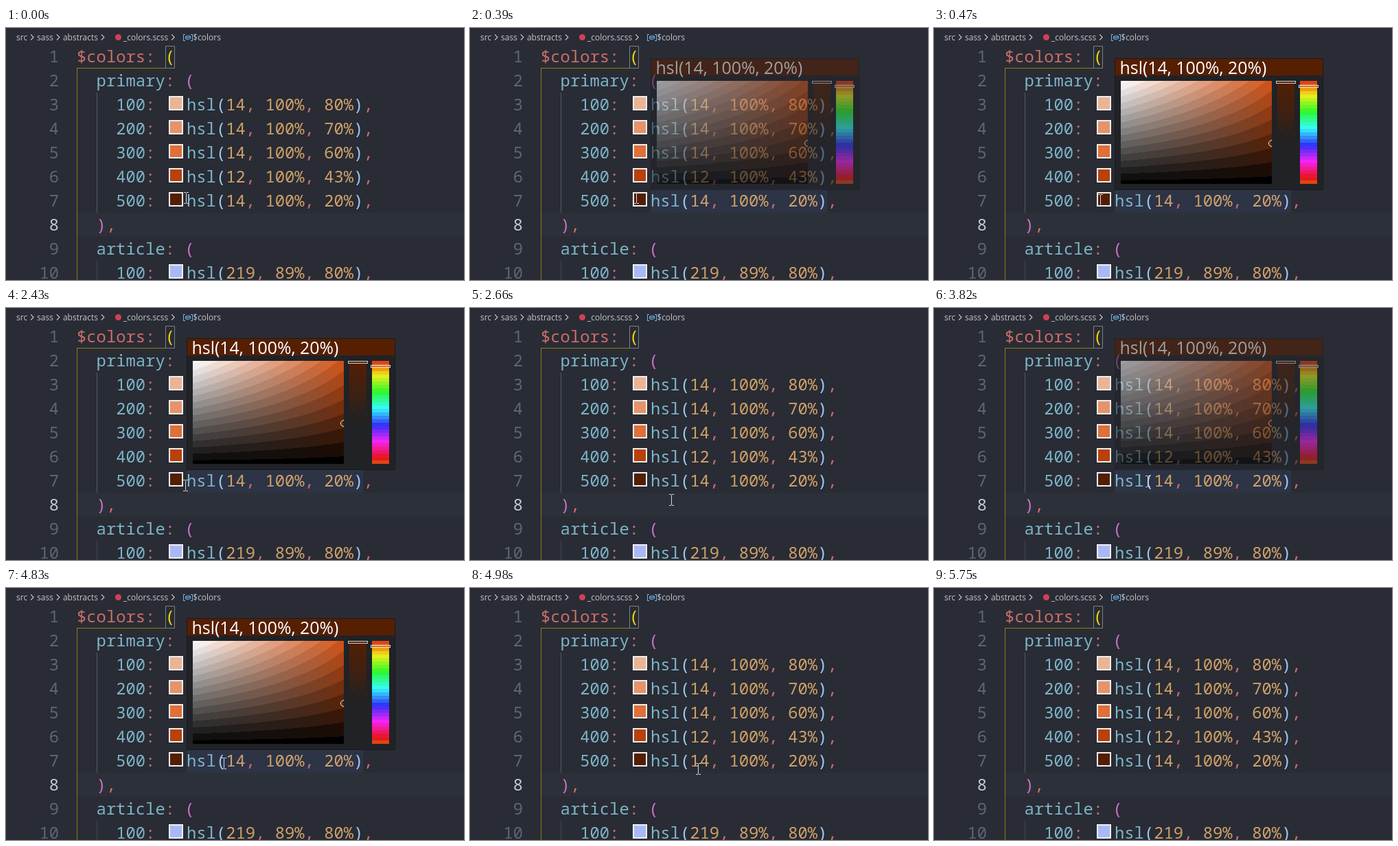
An HTML page with a canvas that plays this animation: 667x367 px, repeating every 6150 ms.

```html
<!DOCTYPE html>
<html lang="en">
<head>
<meta charset="utf-8">
<title>Colour picker hover</title>
<style>
html, body { margin: 0; width: 100%; height: 100%; overflow: hidden; background: #292c34; }
canvas { display: block; }
</style>
</head>
<body>
<canvas id="stage" width="667" height="367"></canvas>
<script>
const W = 667, H = 367, LOOP = 6150, TICK = 77;
const ROW = 35, CELL = 14.3, CODE_X = 103;
const CODE_FONT = '500 23.83px "Noto Sans Mono", monospace';
const UI = '"Open Sans", "Noto Sans", sans-serif';
const C = {
  bg: '#292c34', line: '#2c3139', range: '#2d3446', panel: '#202226',
  red: '#d06c6c', teal: '#7eb4ca', num: '#cfa06a',
  gold: '#f5d313', orchid: '#cd6fc9', sky: '#9ec8f8',
  crumb: '#c3c6cc', gutter: '#5f6576', gutterOn: '#c3c9d6'
};
const ctx = document.getElementById('stage').getContext('2d');

const home = { x: 262, y: 247 };
const moves = [
  { from: 0, to: 150, x: 242, y: 246 },
  { from: 243, to: 470, x: 242, y: 250 },
  { from: 2353, to: 2430, x: 261, y: 258 },
  { from: 2430, to: 2738, x: 325, y: 299 },
  { from: 3213, to: 3670, x: 311, y: 252 },
  { from: 4753, to: 5138, x: 371, y: 282 },
  { from: 5363, to: 5750, x: 644, y: 357 }
];
const hovers = [{ from: 320, to: 2505 }, { from: 3820, to: 4980 }];

const mix = (a, b, p) => a + (b - a) * p;
const ease = p => p * p * (3 - 2 * p);
const ticks = ms => Math.floor(ms / TICK);

function pointerAt(t) {
  let { x, y } = home;
  for (const m of moves) {
    if (t < m.from) break;
    const p = t >= m.to ? 1 : ease(ticks(t - m.from) * TICK / (m.to - m.from));
    x = mix(x, m.x, p);
    y = mix(y, m.y, p);
  }
  return { x: Math.round(x), y: Math.round(y) };
}

function pickerAlpha(t) {
  const h = hovers.find(h => t >= h.from && t < h.to);
  return h ? Math.min(1, 0.55 * (1 + ticks(t - h.from))) : 0;
}

function rect(g, x, y, w, h, fill) {
  g.fillStyle = fill;
  g.fillRect(x, y, w, h);
}

function frame(g, x, y, w, h, color) {
  g.strokeStyle = color;
  g.lineWidth = 1;
  g.strokeRect(x + 0.5, y + 0.5, w - 1, h - 1);
}

function label(g, text, x, y, font, color) {
  g.font = font;
  g.fillStyle = color;
  g.fillText(text, x, y);
}

function code(row, x, ...parts) {
  for (let i = 0; i < parts.length; i += 2) {
    label(ctx, parts[i], x, 50 + ROW * (row - 1), CODE_FONT, parts[i + 1]);
    x += CELL * parts[i].length;
  }
}

function colorRow(row, key, h, s, l, swatch) {
  const y = 99 + ROW * (row - 3);
  code(row, CODE_X + 4 * CELL, key, C.teal, ':', C.red);
  rect(ctx, 237, y, 21, 21, '#eeeeee');
  rect(ctx, 239, y + 2, 17, 17, swatch);
  code(row, 263, 'hsl', C.teal, '(', C.sky, h, C.num, ', ', C.red,
    s, C.num, ', ', C.red, l, C.num, ')', C.sky, ',', C.red);
}

function chevron(x) {
  ctx.strokeStyle = C.crumb;
  ctx.lineWidth = 1.1;
  ctx.beginPath();
  ctx.moveTo(x, 9.5);
  ctx.lineTo(x + 4, 13.5);
  ctx.lineTo(x, 17.5);
  ctx.stroke();
}

function breadcrumbs() {
  const font = '12px ' + UI;
  let x = 15;
  for (const name of ['src', 'sass', 'abstracts', '_colors.scss', '$colors']) {
    label(ctx, name, x, 18, font, C.crumb);
    x += ctx.measureText(name).width;
    if (name !== '$colors') chevron(x + 5);
    x += name === 'abstracts' ? 37 : name === '_colors.scss' ? 36 : 14;
  }
  ctx.fillStyle = '#cf4058';
  ctx.beginPath();
  ctx.arc(163.5, 13.5, 4.5, 0, 7);
  ctx.fill();
  // Variable symbol: a tilted box in brackets
  const color = '#6fb2ee';
  rect(ctx, 258, 9, 1, 10, color);
  rect(ctx, 271, 9, 1, 10, color);
  for (const y of [9, 18]) {
    rect(ctx, 258, y, 3, 1, color);
    rect(ctx, 269, y, 3, 1, color);
  }
  ctx.strokeStyle = color;
  ctx.stroke(new Path2D('M261.5 13l4-2 3 1.5v2.5l-4 2-3-1.500zv0l3 1.500 4-2'));
}

function editor(showRange) {
  rect(ctx, 0, 0, W, H, C.bg);
  rect(ctx, 102, 0, W - 102, 1, '#23262d');
  rect(ctx, CODE_X, 269, W - CODE_X, ROW, C.line);
  breadcrumbs();

  rect(ctx, CODE_X, 58, 130, 1, '#8f7c1c');
  rect(ctx, CODE_X, 58, 1, H - 58, '#8f7c1c');
  rect(ctx, 132, 94, 1, 5 * ROW, '#565a63');
  rect(ctx, 132, 339, 1, 28, '#41454e');
  if (showRange) rect(ctx, 263, 234, 257, ROW, C.range);
  frame(ctx, 232, 26, 14, 33, '#7d7f83');

  for (let n = 1; n <= 10; n++) {
    const text = String(n);
    code(n, 77 - CELL * text.length, text, n === 8 ? C.gutterOn : C.gutter);
  }
  const inner = CODE_X + 2 * CELL;
  code(1, CODE_X, '$colors: ', C.red, '(', C.gold);
  code(2, inner, 'primary', C.teal, ': ', C.red, '(', C.orchid);
  colorRow(3, '100', '14', '100%', '80%', '#ecb397');
  colorRow(4, '200', '14', '100%', '70%', '#e5936a');
  colorRow(5, '300', '14', '100%', '60%', '#de7039');
  colorRow(6, '400', '12', '100%', '43%', '#b9410c');
  colorRow(7, '500', '14', '100%', '20%', '#521f03');
  code(8, inner, ')', C.orchid, ',', C.red);
  code(9, inner, 'article', C.teal, ': ', C.red, '(', C.orchid);
  colorRow(10, '100', '219', '89%', '80%', '#a9b9f7');
}

// Saturation across, brightness down, in coarse tonal bands.
function shadeBox(g, x0, y0, w, h) {
  const img = g.createImageData(w, h);
  const hue = [212, 83, 22], band = 16;
  for (let i = 0; i < w * h; i++) {
    const s = i % w / (w - 1), v = 1 - Math.floor(i / w) / (h - 1);
    const c = hue.map(a => mix(255, a, s));
    const luma = 0.3 * c[0] + 0.59 * c[1] + 0.11 * c[2];
    const k = Math.round(luma * v / band) * band / luma;
    img.data.set([c[0] * k, c[1] * k, c[2] * k, 255], i * 4);
  }
  g.putImageData(img, x0, y0);
}

// Brown fading out, its checkerboard showing only around the middle.
function alphaStrip(g, x, y, w, h) {
  const cell = 5;
  const fill = g.createLinearGradient(0, y, 0, y + h);
  fill.addColorStop(0, '#541f03');
  fill.addColorStop(0.7, C.panel);
  rect(g, x, y, w, h, fill);
  for (let r = 0; r < h / cell; r++) {
    g.globalAlpha = Math.exp(-(((r * cell / h - 0.52) / 0.1) ** 2));
    for (let c = r % 2; c < w / cell; c += 2) {
      rect(g, x + c * cell, y + r * cell, cell, cell, C.panel);
    }
  }
  g.globalAlpha = 1;
}

function hueStrip(g, x, y, w, h) {
  const step = 5;
  for (let r = 0; r < h; r += step) {
    const p = r / (h - step);
    const light = 48 + 11 * Math.sin(Math.PI * p);
    rect(g, x, y + r, w, step, `hsl(${14 + 360 * p}, ${82 + 14 * Math.sin(Math.PI * p)}%, ${light}%)`);
  }
}

function makePicker() {
  const layer = document.createElement('canvas');
  layer.width = W;
  layer.height = H;
  const g = layer.getContext('2d');
  rect(g, 263, 44, 304, 192, C.panel);
  shadeBox(g, 272, 77, 220, 150);
  rect(g, 264, 45, 302, 24, '#571f02');
  frame(g, 263, 44, 304, 192, '#191a1e');
  label(g, 'hsl(14, 100%, 20%)', 270.5, 67, '24.9px ' + UI, '#ffffff');
  alphaStrip(g, 500, 77, 25, 150);
  hueStrip(g, 533, 77, 25, 150);
  frame(g, 498, 77, 29, 4, '#d5d3d1');
  frame(g, 531, 83, 29, 4, '#e2dedb');
  g.strokeStyle = '#ffffff';
  g.beginPath();
  g.arc(492, 168, 4.5, Math.PI / 2, Math.PI * 1.5);
  g.stroke();
  return layer;
}

function ibeam({ x, y }) {
  const color = '#d6d7d9';
  rect(ctx, x, y - 7, 1, 15, color);
  for (const end of [y - 8, y + 8]) {
    rect(ctx, x - 3, end, 3, 1, color);
    rect(ctx, x + 1, end, 3, 1, color);
  }
}

const picker = makePicker();
const leaves = moves[moves.length - 1].to;

function draw(now) {
  const t = now % LOOP;
  const alpha = pickerAlpha(t);
  editor(alpha > 0);
  ctx.globalAlpha = alpha;
  ctx.drawImage(picker, 0, 0);
  ctx.globalAlpha = 1;
  if (t < leaves) ibeam(pointerAt(t));
}

let start;
function tick(now) {
  start ??= now;
  draw(now - start);
  requestAnimationFrame(tick);
}
draw(0);
requestAnimationFrame(tick);
</script>
</body>
</html>
```
